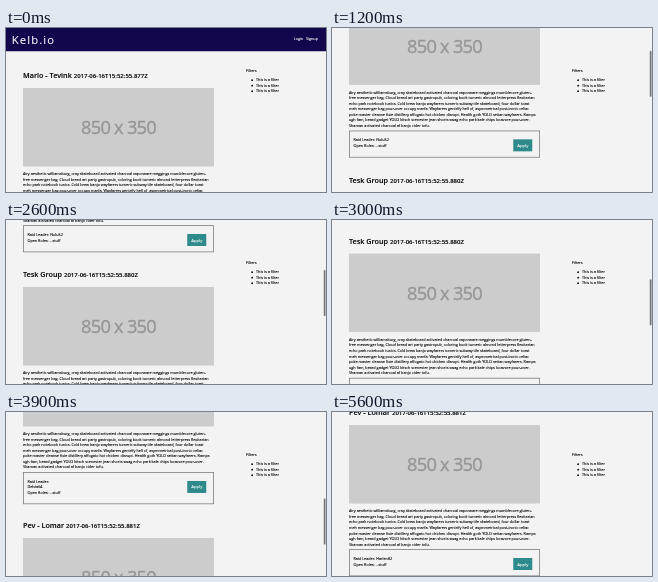
Recreate the animation shown at these times as an HTML page. Size 320 by 164 pixels, loop 5900 ms.

```html
<!DOCTYPE html>
<html lang="en">
<head>
<meta charset="utf-8">
<style>
  html, body { margin: 0; width: 100%; height: 100%; overflow: hidden; background: #f3f3f3; }
  /* Laid out at four times the stage size, then scaled down. */
  #stage { position: absolute; width: 1280px; height: 656px; overflow: hidden; transform: scale(.25); transform-origin: 0 0;
    background: #f3f3f3; color: #000; font: 15px/22.2px "Open Sans", "Noto Sans", sans-serif; white-space: nowrap;
    -webkit-text-stroke: .4px; }
  #stage * { position: absolute; margin: 0; }
  #stage br, #stage small { position: static; }
  header { width: 1280px; height: 93px; background: #12074c; color: #fff; }
  header b { left: 23px; top: 16px; font-size: 45px; font-weight: 400; line-height: 60px; letter-spacing: 4.5px; }
  header span { top: 30px; }
  article { left: 68px; width: 764px; }
  h3 { top: 170px; font-size: 29px; font-weight: 600; line-height: 40px; }
  small { font-size: 24px; }
  .pic { top: 240px; width: 764px; height: 314px; background: #ccc; color: #969696; font-size: 73px; line-height: 314px; letter-spacing: -3px; text-align: center; -webkit-text-stroke: 1.5px; }
  .text { top: 572px; }
  .box { top: 737px; width: 764px; box-sizing: border-box; border: 3px solid #777; }
  .box p { left: 15px; top: 23px; }
  .box span { left: 654px; top: 32px; width: 76px; height: 48px; background: #2f8a8c; color: #fff; font-size: 17px; line-height: 47px; text-align: center; }
  aside { left: 960px; top: 157px; }
  ul { top: 39px; left: 40px; padding: 0; list-style: none; }
  #stage li { position: relative; }
  li::before { content: ""; position: absolute; left: -19px; top: 9px; width: 7px; height: 7px; border-radius: 50%; background: #000; }
  #thumb { left: 1271px; width: 7px; height: 184px; border-radius: 4px; background: #777; }
</style>
</head>
<body>
<div id="stage">
  <div id="page">
    <header><b>Kelb.io</b><span style="left:1151px">Login</span><span style="left:1200px">Signup</span></header>
  </div>
  <aside>Filters<ul><li>This is a filter</li><li>This is a filter</li><li>This is a filter</li></ul></aside>
  <div id="thumb"></div>
</div>
<script>
const page = document.getElementById("page"), thumb = document.getElementById("thumb");

const text = [
  "Airy aesthetic williamsburg, cray skateboard activated charcoal vaporware meggings mumblecore gluten-",
  "free messenger bag. Cloud bread art party gastropub, coloring book tumeric almond letterpress flexitarian",
  "echo park notebook tunics. Cold brew banjo wayfarers tumeric subway tile skateboard, four dollar toast",
  "meh messenger bag pour-over occupy marfa. Wayfarers gentrify hell of, asymmetrical post-ironic celiac",
  "poke master cleanse fixie distillery affogato hot chicken disrupt. Health goth YOLO seitan wayfarers. Ramps",
  "ugh fam, beard gadget YOLO kitsch scenester jean shorts swag echo park kale chips locavore pour-over.",
  "Shaman activated charcoal af banjo cider tofu."
].join("<br>");

function addPost(top, title, stamp, leader, boxHeight) {
  page.insertAdjacentHTML("beforeend", `<article style="top:${top}px">
    <h3>${title} <small>2017-06-16T15:52:55.${stamp}Z</small></h3>
    <div class="pic">850 x 350</div>
    <div class="text">${text}</div>
    <div class="box" style="height:${boxHeight}px"><p>Raid Leader:${leader}<br>Open Roles: ...stuff</p><span>Apply</span></div>
  </article>`);
}
addPost(0, "Marlo - Tevink", 877, " Nolu52", 108);
addPost(744, "Tesk Group", 880, "<br>Delvia64", 128);
addPost(1504, "Pev - Lomar", 881, " Harlen82", 108);

// Scroll path: time in ms, offset in stage pixels.
const path = [[0, 0], [700, 45], [1700, 118.5], [2600, 179], [3500, 261], [4400, 371], [5100, 423]];
const [endTime, endOffset] = path[path.length - 1];
const slope = i => {
  if (i === 0) return .05;
  if (i === path.length - 1) return .02;
  const [a, b] = [path[i - 1], path[i + 1]];
  return (b[1] - a[1]) / (b[0] - a[0]);
};

function scrollAt(t) {
  if (t >= endTime) return endOffset;
  const i = path.findIndex(p => p[0] > t) - 1;
  const [t0, y0] = path[i], [t1, y1] = path[i + 1];
  const d = t1 - t0, u = (t - t0) / d, v = 1 - u;
  return y0 * v * v * (1 + 2 * u) + y1 * u * u * (3 - 2 * u) + d * u * v * (slope(i) * v - slope(i + 1) * u);
}

const start = performance.now();
function draw() {
  const t = Math.floor((performance.now() - start) % 5900 / 100) * 100;
  const y = scrollAt(t);
  page.style.transform = `translateY(${-4 * y}px)`;
  thumb.style.top = y * 4 * 164 / (endOffset + 164) + "px";
  thumb.style.opacity = t < 100 || t >= 5600 ? 0 : t >= 5500 ? .5 : 1;
  requestAnimationFrame(draw);
}
draw();
</script>
</body>
</html>
```
